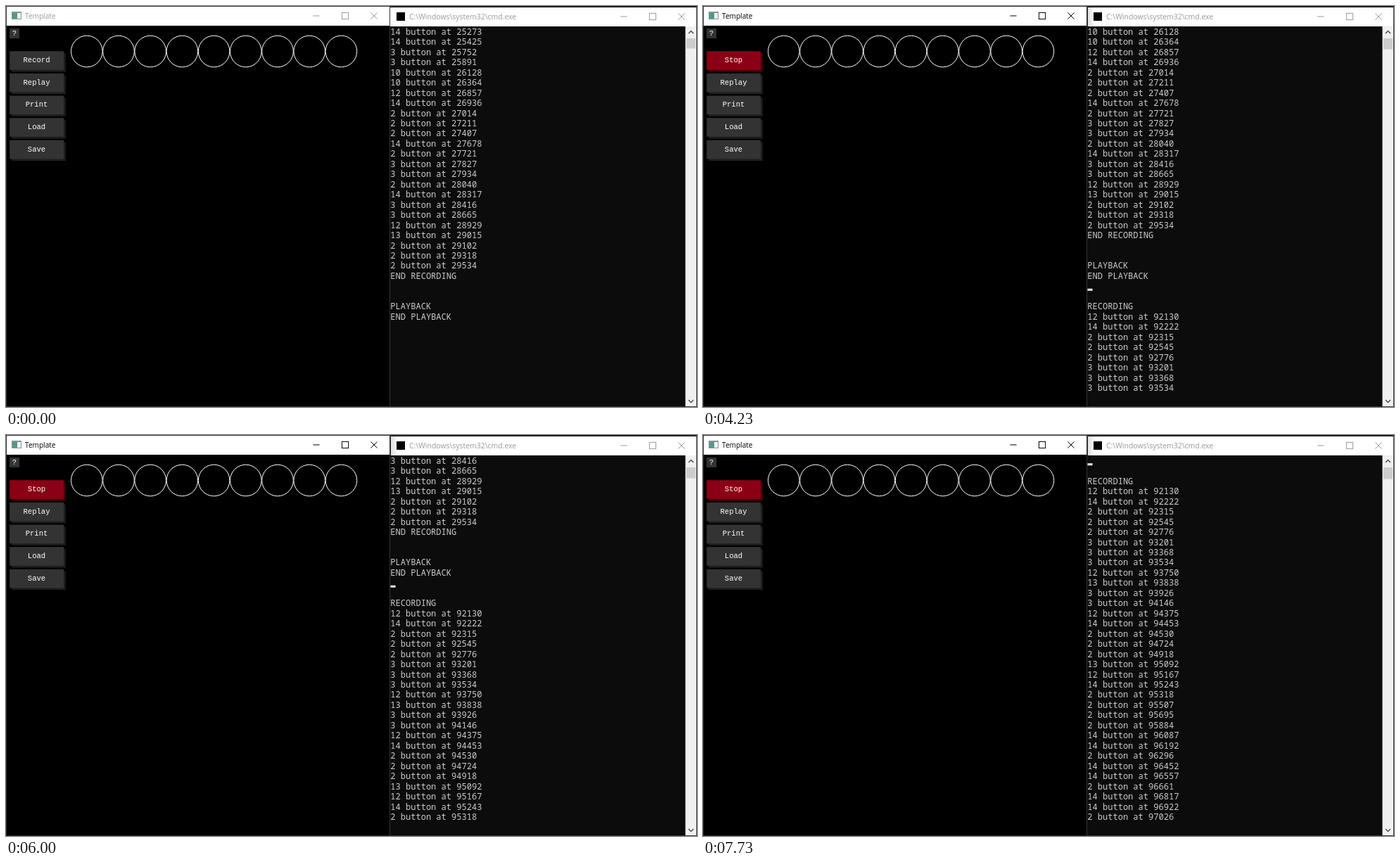
Recreate the animation shown at these times as an HTML page with a canvas. Size 982x570 px, loop 8 s.

```html
<!DOCTYPE html>
<html lang="en">
<head>
<meta charset="utf-8">
<title>Recorder</title>
<style>
  html, body { margin: 0; width: 100%; height: 100%; overflow: hidden; background: #000; }
  canvas { display: block; }
</style>
</head>
<body>
<canvas id="stage" width="982" height="570"></canvas>
<script>
const ctx = document.getElementById('stage').getContext('2d');
const LOOP = 8000;
const ROWS = 36;
const UI_SCALE = 0.904;
const ACTIVATE = 830, RECORD = 1770, RELEASE = 2030;
const CLOCK_OFFSET = 89320;
const TITLE = '"Open Sans", "Noto Sans", sans-serif';
const BUTTON = '"Liberation Mono", monospace';
const CONSOLE = '"Noto Sans Mono", "DejaVu Sans Mono", monospace';

// Spreads a run of presses from start to end; buttons above 9 are followed more quickly.
function phrase(buttons, start, end) {
  const presses = buttons.split(' ');
  const weight = button => button > 9 ? 1 : 2.5;
  const total = presses.slice(0, -1).reduce((sum, button) => sum + weight(button), 0);
  let stamp = start;
  return presses.map(button => {
    const press = { text: `${button} button at ${Math.round(stamp)}`, stamp };
    stamp += (end - start) * weight(button) / total;
    return press;
  });
}

const earlier = [
  phrase('14 14', 25273, 25425),
  phrase('3 3', 25752, 25891),
  phrase('10 10', 26128, 26364),
  phrase('12 14 2 2 2', 26857, 27407),
  phrase('14 2 3 3 2', 27678, 28040),
  phrase('14 3 3', 28317, 28665),
  phrase('12 13 2 2 2', 28929, 29534)
].flat();

const live = [
  phrase('12 14 2 2 2', 92130, 92776),
  phrase('3 3 3', 93201, 93534),
  phrase('12 13 3 3', 93750, 94146),
  phrase('12 14 2 2 2', 94375, 94918),
  phrase('13 12 14 2 2 2 2', 95092, 95884)
].flat();
for (let i = 0; i < 3; i++) {
  const start = 96087 + 365 * i;
  live.push(...phrase('14 14 2', start, start + 209));
}

// Presses appear on the next tick of a 30 fps clock.
function shownAt(stamp) {
  const tick = Math.ceil((stamp - CLOCK_OFFSET) * 0.03);
  return Math.round(tick / 0.3) * 10;
}

const log = [
  ...earlier.map(press => ({ text: press.text, at: 0 })),
  ...['END RECORDING', '', '', 'PLAYBACK', 'END PLAYBACK', '', ''].map(text => ({ text, at: 0 })),
  { text: 'RECORDING', at: RECORD },
  ...live.map(press => ({ text: press.text, at: shownAt(press.stamp) }))
];
const CARET_LINE = earlier.length + 5;

function rect(x, y, w, h, color) {
  ctx.fillStyle = color;
  ctx.fillRect(x, y, w, h);
}

function label(text, x, y, size, family, color, align = 'left') {
  ctx.font = `${size}px ${family}`;
  ctx.fillStyle = color;
  ctx.textAlign = align;
  ctx.fillText(text, x, y);
}

function line(points, color, width = 1) {
  ctx.strokeStyle = color;
  ctx.lineWidth = width;
  ctx.beginPath();
  points.forEach(([x, y]) => ctx.lineTo(x, y));
  ctx.stroke();
}

// Minimise, maximise and close signs; (x, y) is the centre of the first.
function windowControls(x, y, color) {
  const r = 4.6, step = 41;
  const max = x + step, close = x + 2 * step;
  line([[x - r, y], [x + r, y]], color);
  ctx.strokeRect(max - r, y - r, 2 * r, 2 * r);
  line([[close - r, y - r], [close + r, y + r]], color);
  line([[close + r, y - r], [close - r, y + r]], color);
}

function button(index, text, fill, shadow) {
  const y = 64.2 + 35 * UI_SCALE * index;
  const w = 85 * UI_SCALE, h = 29.5 * UI_SCALE, drop = 3 * UI_SCALE;
  rect(5.2 + drop, y + drop, w, h, shadow);
  rect(5.2, y, w, h, fill);
  label(text, 43.5, y + 16, 10.55, BUTTON, '#fff', 'center');
}

function circle(cx, cy, r) {
  ctx.strokeStyle = '#fff';
  ctx.lineWidth = 1;
  ctx.beginPath();
  ctx.arc(cx, cy, r, 0, 2 * Math.PI);
  ctx.stroke();
}

function drawApp(t) {
  const active = t >= ACTIVATE;
  const ink = active ? '#000' : '#999';

  rect(0, 0, 546, 570, active ? '#2a2a2a' : '#333');
  rect(1, 1, 544, 568, '#000');
  rect(1, 1, 544, 27, '#fff');

  rect(8, 8, 14, 11, '#8a9296');
  rect(9, 10, 12, 8, '#eef2f3');
  rect(9, 10, 7, 8, '#4f9a8c');
  label('Template', 27, 18, 10.1, TITLE, ink);
  windowControls(441, 14, ink);

  rect(5, 32, 14, 14, '#333');
  label('?', 12, 42, 10.55, BUTTON, '#fff', 'center');

  const hoverReplay = t >= 1370 && t < 1430;
  const hoverRecord = t >= 1500 && t < RELEASE;
  if (t >= RECORD) button(0, 'Stop', hoverRecord ? '#b0001a' : '#8a0014', '#4c000a');
  else button(0, 'Record', hoverRecord ? '#505050' : '#333', '#1e1e1e');
  ['Replay', 'Print', 'Load', 'Save'].forEach((text, i) =>
    button(i + 1, text, i === 0 && hoverReplay ? '#505050' : '#333', '#1e1e1e'));

  for (let i = 0; i < 9; i++) circle(114.8 + 50 * UI_SCALE * i, 64.5, 22.3);
}

function drawScrollbar(t) {
  rect(965.5, 29, 15.5, 540, '#f0f0f0');
  const growth = (t >= 4230) + (t >= 6900);
  rect(967, 46, 13, 14.5 + growth, '#cdcdcd');
  line([[970, 39], [973.5, 35.5], [977, 39]], '#505050', 1.5);
  line([[970, 560], [973.5, 563.5], [977, 560]], '#505050', 1.5);
}

function drawConsole(t) {
  rect(545, 0, 437, 570, '#333');
  rect(546, 1, 435, 568, '#0c0c0c');
  rect(546, 2, 435, 27, '#fff');
  rect(555, 9, 12, 12, '#000');
  label('C:\\Windows\\system32\\cmd.exe', 573, 19, 10.45, TITLE, '#999');
  windowControls(878, 15, '#999');

  if (t >= ACTIVATE) {
    const shade = ctx.createLinearGradient(546, 0, 557, 0);
    shade.addColorStop(0, 'rgba(0,0,0,.15)');
    shade.addColorStop(1, 'rgba(0,0,0,0)');
    rect(546, 2, 11, 27, shade);
    rect(545, 0, 2, 29, '#333');
  }

  const shown = log.filter(entry => t >= entry.at);
  const scroll = Math.max(0, shown.length - ROWS);
  const baseline = row => 40.8 + 16 * UI_SCALE * row;
  shown.slice(scroll).forEach((entry, row) =>
    label(entry.text, 546.3, baseline(row), 12.05, CONSOLE, '#ccc'));
  if (scroll) rect(546.4, baseline(CARET_LINE - scroll) - 0.7, 7.2, 3.2, '#ddd');

  drawScrollbar(t);
}

function frame(now) {
  const t = now % LOOP;
  drawApp(t);
  drawConsole(t);
  requestAnimationFrame(frame);
}
requestAnimationFrame(frame);
</script>
</body>
</html>
```
